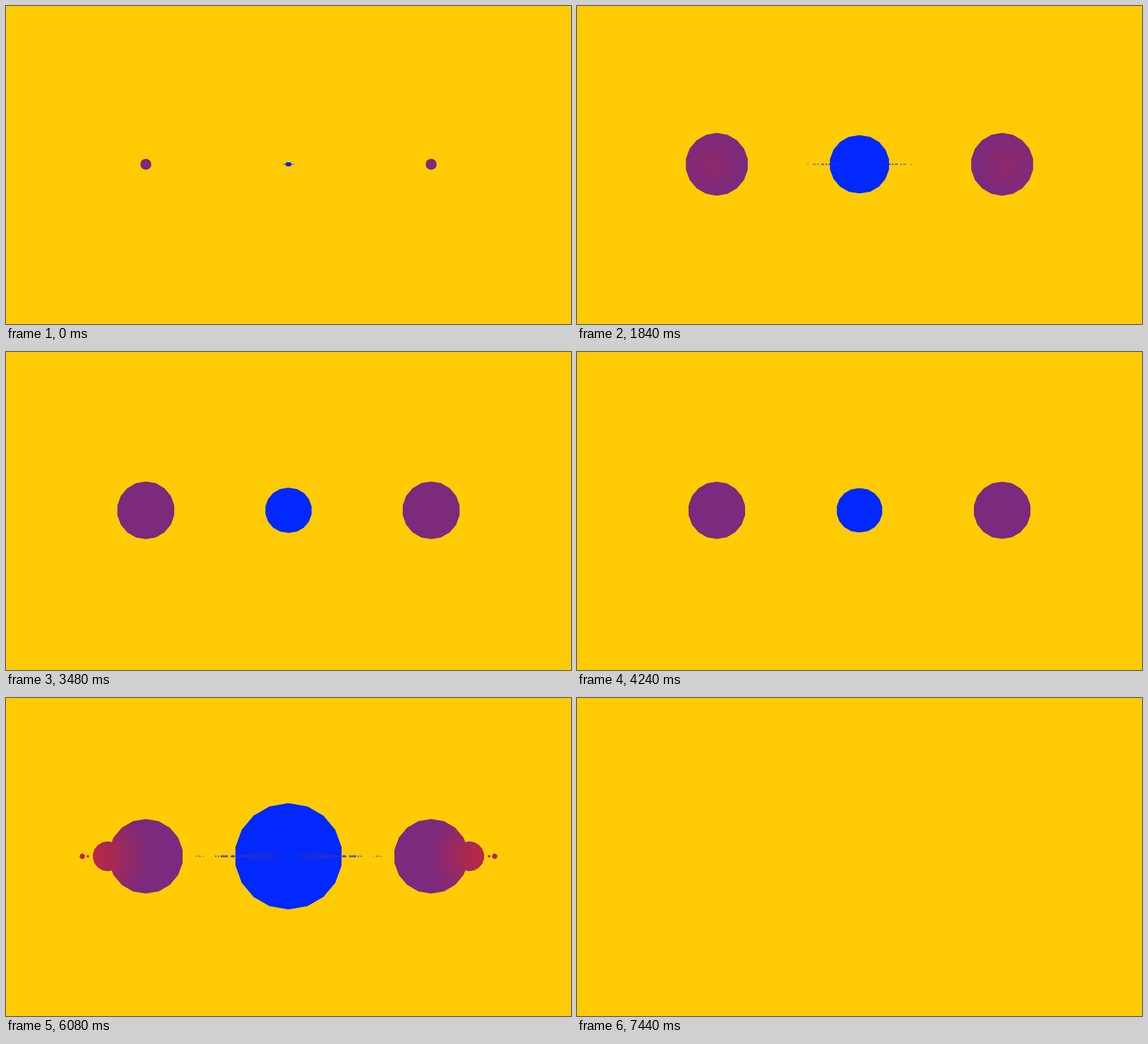
These frames come from a looping animation (800x450 px, 7.48 s). An HTML page with a canvas:

```html
<!DOCTYPE html>
<html>
<head>
<meta charset="utf-8">
<style>
  html, body { margin: 0; height: 100%; overflow: hidden; background: #fecb05; }
  canvas { display: block; }
</style>
</head>
<body>
<canvas id="stage" width="800" height="450"></canvas>
<script>
const ctx = document.getElementById('stage').getContext('2d');
const LOOP = 7480, STEP = 40, BEAT = 2200 / 3;
const CX = 400, CY = 224, SIDE = 202;
const YELLOW = '#fecb05', BLUE = '#0028ff', PURPLE = '#7b2a7e';

// Loudness of the melody: [time, level]
const melody = [[0, .05], [800, .6], [2800, .5], [4240, 0], [5200, .17], [6080, 1], [7400, 0]];

const clamp = x => Math.max(0, Math.min(1, x));

function smooth(from, to, x) {
  const u = clamp((x - from) / (to - from));
  return u * u * (3 - 2 * u);
}

function along(points, t) {
  const i = points.findIndex(([time]) => time > t);
  if (i < 0) return points[points.length - 1][1];
  const [t0, a] = points[i - 1], [t1, b] = points[i];
  return a + (b - a) * (t - t0) / (t1 - t0);
}

function noise(n) {
  const v = Math.sin(n * 12.9898 + 4.1) * 43758.5453;
  return v - Math.floor(v);
}

// Sharp attack, decay to a sustained level, then release
function kick(p) {
  const body = 29 + 272 * Math.exp(-p / 120);
  return Math.max(3, body * smooth(53, 150, p) * (1 - smooth(620, BEAT, p)));
}

// Adds an 18-sided disc to the current path
function disc(x, r) {
  if (r < .3) return;
  for (let i = 0; i < 18; i++) {
    const a = i * Math.PI / 9;
    ctx[i ? 'lineTo' : 'moveTo'](x + r * Math.sin(a), r * Math.cos(a));
  }
  ctx.closePath();
}

// Everything is drawn for the right half and mirrored
function mirrored(draw) {
  for (const side of [-1, 1]) {
    ctx.setTransform(side, 0, 0, 1, CX, CY);
    draw();
  }
}

function sideDiscs(radius, spark, warm) {
  const hot = SIDE + 70 * warm * warm;
  const glow = ctx.createRadialGradient(hot, 0, 0, hot, 0, 35 + 40 * warm);
  glow.addColorStop(0, `rgba(188,40,65,${warm})`);
  glow.addColorStop(1, 'rgba(188,40,65,0)');
  ctx.beginPath();
  disc(SIDE, radius);
  disc(256, 21 * spark);
  disc(284, 1.7 * spark);
  disc(292, 3.6 * spark);
  for (const fill of [PURPLE, glow]) {
    ctx.fillStyle = fill;
    ctx.fill();
  }
}

function centreDisc(radius) {
  ctx.beginPath();
  disc(1.3, radius);
  ctx.fillStyle = BLUE;
  ctx.fill();
}

function waveLine(level, bulge, seed) {
  const width = 142 * level;
  const shade = ctx.createLinearGradient(0, 0, 75, 0);
  shade.addColorStop(0, BLUE);
  shade.addColorStop(1, '#2d2dc4');
  ctx.fillStyle = shade;
  for (let d = 0; d < width; d++) {
    const far = d / width;
    const n = noise(Math.floor(d / 2) + seed);
    const swell = .8 * Math.sqrt(bulge) * Math.max(0, 1 - d / (bulge + 1));
    if (swell < .1 && n < far * .7) continue;
    const h = .5 + swell + 3 * level * n * (1 - far);
    ctx.globalAlpha = Math.min(1, 1.4 - far);
    ctx.fillRect(d, -h, 1, 2 * h);
  }
  ctx.globalAlpha = 1;
}

function render(t) {
  const beat = Math.floor(t / BEAT), p = t - beat * BEAT;
  const fade = 1 - smooth(6400, 7400, t);
  const level = along(melody, t);
  const blue = fade * kick(p);
  const purple = Math.max(0, 14 * Math.log(blue) - 7.6);
  // Satellites flash on two beats out of four
  const spark = beat % 4 < 2 ? fade * Math.sin(Math.PI * clamp((p - 110) / 212)) : 0;
  const warm = Math.max(spark, level * level);
  const bulge = 74 * level * level * (1 - smooth(220, 450, p));

  ctx.setTransform(1, 0, 0, 1, 0, 0);
  ctx.fillStyle = YELLOW;
  ctx.fillRect(0, 0, 800, 450);

  mirrored(() => sideDiscs(purple, spark, warm));
  mirrored(() => centreDisc(blue));
  mirrored(() => waveLine(level, bulge, t / STEP));
}

function frame(now) {
  render(Math.floor(now % LOOP / STEP) * STEP);
  requestAnimationFrame(frame);
}
render(0);
requestAnimationFrame(frame);
</script>
</body>
</html>
```
